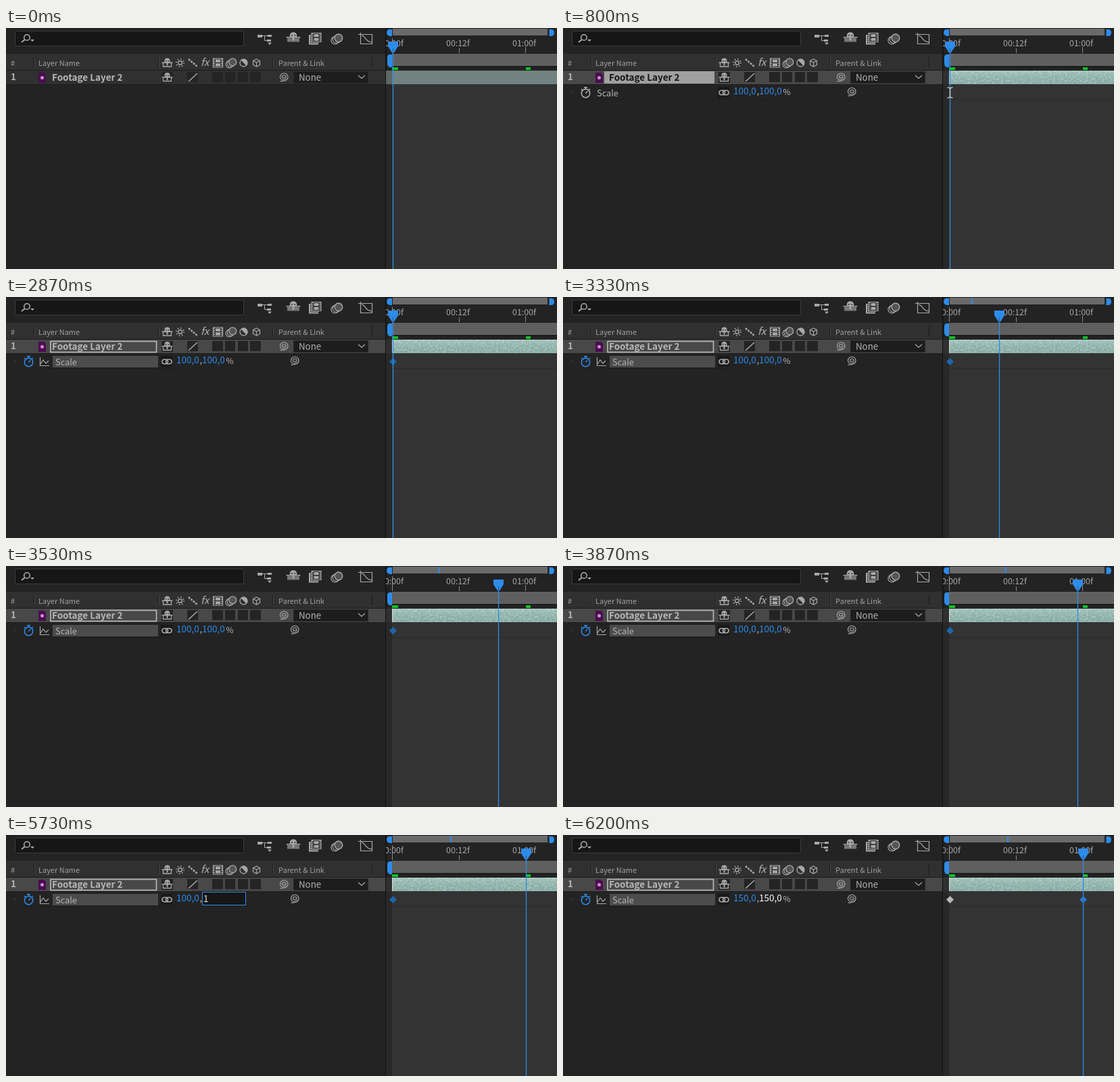
Animation of 815x356 px, one loop 7.19 s. Source, as an HTML page:

```html
<!DOCTYPE html>
<html lang="en">
<head>
<meta charset="utf-8">
<title>Scale keyframes</title>
<style>
  html, body { margin: 0; width: 100%; height: 100%; overflow: hidden; background: #232323; }
  svg { display: block; width: 100%; height: 100%; }
  text { font: 13.3px "Noto Sans CJK SC", "Noto Sans CJK JP", "Noto Sans", sans-serif; fill: #b4b4b4; white-space: pre; }
  .head { font-size: 11px; fill: #a0a0a0; }
  .bold { font-weight: 700; }
  .tick { font-size: 12.4px; text-anchor: middle; fill: #a8a8a8; }
  .num { font-size: 13.5px; fill: #2d8ceb; }
  .icon { color: #a8a8a8; }
  .line { fill: none; stroke: currentColor; }
</style>
</head>
<body>
<svg viewBox="0 0 815 356" preserveAspectRatio="none">
  <defs>
    <linearGradient id="teal" x2="0" y2="1">
      <stop stop-color="#a2c3bd"/><stop offset=".35" stop-color="#8fb3ac"/><stop offset="1" stop-color="#83a8a0"/>
    </linearGradient>
    <filter id="grain" x="0" y="0" width="1" height="1">
      <feTurbulence type="fractalNoise" baseFrequency=".35" numOctaves="2" seed="4"/>
      <feColorMatrix values="0 0 0 0 .8  0 0 0 0 .95  0 0 0 0 .9  .9 0 0 0 -.36"/>
    </filter>
    <clipPath id="right"><path d="M562 0h253v356H562z"/></clipPath>
    <g id="head">
      <path fill="currentColor" d="M-4-1V-3A4 4 0 0 1 4-3V-1H8V.5H1V4H-1V.5H-8V-1Z"/>
      <path fill="#262626" d="M-2.5-3.500h1.500v1.500h-1.500zM1-3.500h1.500v1.500H1z"/>
    </g>
    <g id="shy">
      <use href="#head"/>
      <path class="line" stroke-width="1.3" d="M-6 .5V5.500H6V.5"/>
    </g>
    <g id="film">
      <path class="line" stroke-width="1.2" d="M-7-6.500H7V6.500H-7Z"/>
      <path class="line" stroke-width="2" stroke-dasharray="1.500 1.500" d="M-5.500-6V6M5.500-6V6"/>
      <path fill="currentColor" d="M-3.500-5H3.500V-.7H-3.500ZM-3.500.7H3.500V5H-3.500Z"/>
    </g>
    <g id="blur">
      <circle class="line" cx="-2.500" cy="2" r="4.800"/>
      <circle class="line" cx="-.5" cy=".8" r="4.800"/>
      <circle cx="2" cy="-1" r="5" fill="#555" stroke="currentColor" stroke-width="1.2"/>
    </g>
    <path id="whip" class="line" stroke-width="1.2" d="M1.500 0A1.750 1.750 0 0 1-2 0A2.750 2.750 0 0 1 3.500 0A4.250 4.250 0 0 1-5 0A5.750 5.750 0 0 1 6.500 0C6.500 4 2 6.500-5 6"/>
    <path id="gem" d="M0-5.500L5.500 0 0 5.500-5.500 0Z"/>
    <path id="beam" class="line" stroke-width="1.5" d="M-4-7.500Q0-7.500 0-5.500Q0-7.500 4-7.500M0-6V6M-4 7.500Q0 7.500 0 5.500Q0 7.500 4 7.500"/>
  </defs>

  <!-- toolbar -->
  <rect x="13.500" y="4.500" width="338" height="22" rx="2" fill="#161616" stroke="#3c3c3c"/>
  <g class="icon">
    <circle class="line" cx="31" cy="14" r="4.300" stroke-width="1.6"/>
    <path class="line" stroke-width="2" d="M28 17L23 21"/>
    <path fill="currentColor" d="M36 17h6l-3 3z"/>
    <path fill="currentColor" d="M372 10h7v4h-7zM387 10h6v3h-6zM386 17h6v3h-6zM387 21.500h6l-3 3.500z"/>
    <path class="line" d="M379 11.500H387M382.500 12V18.500H386"/>
    <path fill="#777" d="M416 15h18v5.500h-18z"/>
    <use href="#head" transform="translate(425 14) scale(1.300 1.100)"/>
    <path class="line" stroke-width="2" d="M449 10V23.500H462"/>
    <path class="line" stroke-width="1.500" stroke-dasharray="1.500 1.500" d="M451 10V21.500H463"/>
    <use href="#film" x="459" y="14"/>
  </g>
  <g class="icon" id="blurTool"><use href="#blur" transform="translate(489.500 16) scale(1.180)"/></g>
  <g class="icon" id="graphTool">
    <path class="line" stroke-width="1.200" d="M524.500 7V23.500H542M521 9.500H541.500V24M526 11C533 12 530 20 541 21"/>
  </g>
  <path id="puck" fill="#24a98c" d="M-6 0H6L5 4 1 6-5 3Z"/>

  <!-- column heads -->
  <path fill="#303030" d="M0 38h561v24H0z"/>
  <path stroke="#1b1b1b" d="M0 62.500H561M41.500 43V58M225.500 43V58M394.500 43V58M541.500 43V58"/>
  <path stroke="#484848" d="M42.500 43V58M226.500 43V58M395.500 43V58"/>
  <text class="head" x="7" y="56" font-style="italic">#</text>
  <text class="head" x="48" y="56">Layer Name</text>
  <text class="head" x="403" y="56">Parent &amp; Link</text>
  <g class="icon">
    <use href="#shy" x="238.500" y="51.500"/>
    <circle class="line" cx="257.500" cy="51.500" r="2.800" stroke-width="1.400"/>
    <circle class="line" cx="257.500" cy="51.500" r="5.500" stroke-width="2" stroke-dasharray="1.400 2.920"/>
    <path class="line" stroke-width="2.500" stroke-dasharray="3 1.500" d="M270 46L283 57"/>
    <text x="288" y="56" style="font-size:15px;font-style:italic;fill:#b0b0b0">fx</text>
    <use href="#film" x="313.500" y="51.500"/>
    <use href="#blur" transform="translate(333 51.500) scale(1.100)"/>
    <circle class="line" cx="351.500" cy="51.500" r="5.500" stroke-width="1.300"/>
    <path fill="currentColor" d="M347.600 47.600A5.500 5.500 0 0 1 355.400 55.400Z"/>
    <path class="line" stroke-width="1.200" d="M370.500 46L375.500 48.500V54.500L370.500 57 365.500 54.500V48.500ZM365.500 48.500L370.500 51 375.500 48.500M370.500 51V57"/>
  </g>

  <!-- layer row -->
  <rect id="row" y="63" width="561" height="20"/>
  <path stroke="#1d1d1d" d="M0 83.500H561"/>
  <text class="bold" x="7" y="77">1</text>
  <path fill="#4d0b52" d="M48 66h8l3 3v12H48z"/>
  <circle cx="53.500" cy="73.500" r="2.500" fill="#c693c9"/>
  <rect id="nameBox" stroke-width="1.700"/>
  <text id="name" class="bold" x="68" y="78" style="font-size:13.500px">Footage Layer 2</text>
  <path fill="#242424" d="M230 65h17v16h-17zM268 65h16v15h-16zM305 65h16v15h-16zM324 65h15v15h-15zM343 65h15v15h-15zM361 65h16v15h-16z"/>
  <g class="icon">
    <use href="#shy" x="238.500" y="73"/>
    <path class="line" stroke-width="1.600" d="M270 79L283 67"/>
    <use href="#whip" x="410.500" y="72.500"/>
  </g>
  <rect x="425.500" y="64.500" width="110" height="17" fill="#1d1d1d" stroke="#282828"/>
  <text x="433" y="78">None</text>
  <path class="line icon" stroke-width="1.200" d="M521 70L526 74.500 531 70"/>

  <!-- property row -->
  <g id="prop">
    <path stroke="#1e1e1e" d="M12 105.500H561"/>
    <path fill="#484848" d="M12 94h1.500v2H12z"/>
    <rect id="watchBox" x="25" y="87" width="17" height="17" fill="#141414"/>
    <g id="watch">
      <circle class="line" cx="33.500" cy="96.500" r="6.200" stroke-width="1.500"/>
      <path class="line" stroke-width="1.500" d="M31 87.700H36M33.500 88V90.500M38.500 90L40 91.500M33.500 96.500L36 93.500M27 91.500L28.500 90"/>
    </g>
    <g id="keyed">
      <path class="line icon" stroke-width="1.200" d="M50.500 89V101.500H64M51 99L55 93 59 98 63 94"/>
      <path fill="#4c4c4c" d="M69 87h156v17H69z"/>
    </g>
    <text id="label" y="100.500" style="font-size:12.800px">Scale</text>
    <path fill="#191919" d="M229 87h17v16h-17z"/>
    <g class="icon">
      <rect class="line" x="231" y="92.300" width="8.500" height="6.500" rx="3.200" stroke-width="1.600"/>
      <rect class="line" x="236.500" y="92.300" width="8.500" height="6.500" rx="3.200" stroke-width="1.600"/>
    </g>
    <text id="valX" class="num" x="252" y="98">100,0</text>
    <text x="286.500" y="98">,</text>
    <text id="valY" class="num" x="290" y="98">100,0</text>
    <text x="325.500" y="99" style="font-size:12px">%</text>
    <g class="icon"><use href="#whip" x="426.500" y="94"/></g>
    <g id="edit">
      <rect x="290.500" y="84.500" width="64" height="19" fill="#161616" stroke="#2d8ceb"/>
      <rect id="pick" x="292" y="87" width="34" height="15" fill="#2467a8"/>
      <text id="typed" x="292" y="99" style="fill:#e6e6e6"></text>
    </g>
  </g>

  <!-- timeline -->
  <path fill="#111" d="M561 0h1.500v356H561z"/>
  <g clip-path="url(#right)">
    <path fill="#282828" d="M562 83h9v273h-9z"/>
    <path fill="#333" d="M571 83h244v273H571z"/>
    <path fill="#6a6a6a" d="M572 1h229v10H572z"/>
    <path fill="#2d8ceb" d="M571 2V12H568Q563 11 563 7 563 2 568 2ZM803.500 2H806Q811 2 811 7 811 12 806 12H803.500Z"/>
    <path id="navMark" stroke="#2d8ceb" stroke-width="2" d="M0 2V11"/>
    <path stroke="#8a8a8a" d="M571.500 15V37M670.500 30V37M768.500 28V37"/>
    <path fill="#1b1b1b" d="M562 37h253v1H562z"/>
    <path fill="#5f5f5f" d="M571 38h244v18H571z"/>
    <path fill="#2d8ceb" d="M571 39V58H568Q564 57 564 52V44Q564 39 568 39Z"/>
    <path fill="#1c1c1c" d="M571 56h244v2H571z"/>
    <path fill="#0fc124" d="M571 58h9v4h-9zM769 58h7v4h-7z"/>
    <text class="tick" x="570.500" y="27">00:00f</text>
    <text class="tick" x="668.500" y="27">00:12f</text>
    <text class="tick" x="766.500" y="27">01:00f</text>
    <path id="barLead" d="M562 63h10v20h-10z"/>
    <rect id="bar" x="571" y="63" width="244" height="20"/>
    <rect id="texture" x="571" y="63" width="244" height="20" filter="url(#grain)"/>
    <path stroke="#272727" d="M562 62.500H815"/>
    <path id="inPoint" fill="#d6dedc" d="M571 63h1v20h-1z"/>
    <path id="trackLine" stroke="#2a2a2a" d="M562 105.500H815"/>
    <use id="key1" href="#gem" x="572.500" y="95.500"/>
    <g id="playhead">
      <path d="M0 34V356" stroke="#2d8ceb" stroke-width="1.300"/>
      <path fill="#2d8ceb" d="M-7.500 20H7.500V27L1.500 36.500H-1.500L-7.500 27Z"/>
      <path stroke="#1f5f9f" d="M0 30V37"/>
    </g>
    <use id="key2" href="#gem" x="769.500" y="95.500" fill="#2478cb"/>
  </g>
  <g id="cursor" color="#c8c8c8"><use href="#beam" y="95.500"/></g>
</svg>
<script>
  const LOOP = 7190;
  const BLUE = '#2d8ceb';

  // Each step changes part of the state from its time on.
  const steps = [
    [0, { frame: 0, x: '100,0', y: '100,0' }],
    [330, { selected: true }],
    [800, { open: true, beam: 572.5 }],
    [2130, { beam: 0, keyed: true, pressed: true }],
    [2270, { pressed: false }],
    [2400, { outlined: true }],
    [2730, { hot: 'blurTool' }],
    [2800, { hot: 'graphTool' }],
    [2870, { hot: '' }],
    [3200, { frame: 2 }],
    [3270, { frame: 5 }],
    [3330, { frame: 9 }],
    [3400, { frame: 13 }],
    [3470, { frame: 16 }],
    [3530, { frame: 19 }],
    [3600, { frame: 20 }],
    [3670, { frame: 21 }],
    [3730, { frame: 22 }],
    [3870, { frame: 23 }],
    [4200, { frame: 24 }],
    [4470, { beam: 765.5 }],
    [4530, { beam: 0 }],
    [4670, { puck: 277 }],
    [4730, { puck: 0 }],
    [4930, { hoverY: true }],
    [5130, { edit: '100' }],
    [5200, { pick: true }],
    [5730, { edit: '1', pick: false }],
    [5870, { edit: '15' }],
    [6000, { edit: '150' }],
    [6070, { edit: '', x: '150,0', y: '150,0', hoverY: false, key2: true }],
    [6200, { hoverY: true }]
  ];

  const el = {};
  document.querySelectorAll('[id]').forEach(node => el[node.id] = node);

  const show = (id, on) => el[id].style.display = on ? '' : 'none';
  const paint = (id, fill) => el[id].style.fill = fill;
  const move = (id, x) => el[id].setAttribute('transform', `translate(${x} 0)`);
  const write = (id, value) => { if (el[id].textContent !== value) el[id].textContent = value; };

  function setNameBox(s) {
    const box = s.outlined ? [66, 65.5, 156.5, 16] : [61, 64, 163, 18];
    ['x', 'y', 'width', 'height'].forEach((key, i) => el.nameBox.setAttribute(key, box[i]));
    paint('nameBox', s.outlined ? '#484848' : '#a0a0a0');
    el.nameBox.style.stroke = s.outlined ? '#b8b8b8' : 'none';
    show('nameBox', s.selected);
    paint('name', s.selected && !s.outlined ? '#151515' : '#b8b8b8');
  }

  function render(t) {
    const s = Object.assign({}, ...steps.filter(([at]) => at <= t).map(step => step[1]));

    paint('row', s.selected ? '#484848' : '#303030');
    setNameBox(s);
    paint('bar', s.selected ? 'url(#teal)' : '#718380');
    paint('barLead', s.selected ? '#303030' : '#5c6766');
    show('texture', s.selected);
    show('inPoint', s.selected);

    show('prop', s.open);
    show('trackLine', s.open);
    show('watchBox', s.pressed);
    show('keyed', s.keyed);
    el.watch.style.color = s.keyed ? BLUE : '#b4b4b4';
    el.label.setAttribute('x', s.keyed ? 73 : 50);
    write('valX', s.x);
    write('valY', s.y);
    paint('valY', s.hoverY ? '#fff' : BLUE);
    show('edit', s.edit);
    show('pick', s.pick);
    write('typed', s.edit || '');

    for (const id of ['blurTool', 'graphTool']) el[id].style.color = s.hot === id ? '#e6e6e6' : '';

    move('playhead', Math.floor(572 + s.frame * 8.22) + 0.5);
    move('navMark', 573.5 + s.frame * 3.52);
    show('navMark', s.frame);
    show('key1', s.keyed);
    paint('key1', s.key2 ? '#b9b9b9' : '#1d65ab');
    show('key2', s.key2);

    show('cursor', s.beam);
    move('cursor', s.beam || 0);
    show('puck', s.puck);
    move('puck', s.puck || 0);
  }

  function tick() {
    render(performance.now() % LOOP);
    requestAnimationFrame(tick);
  }
  tick();
</script>
</body>
</html>
```
